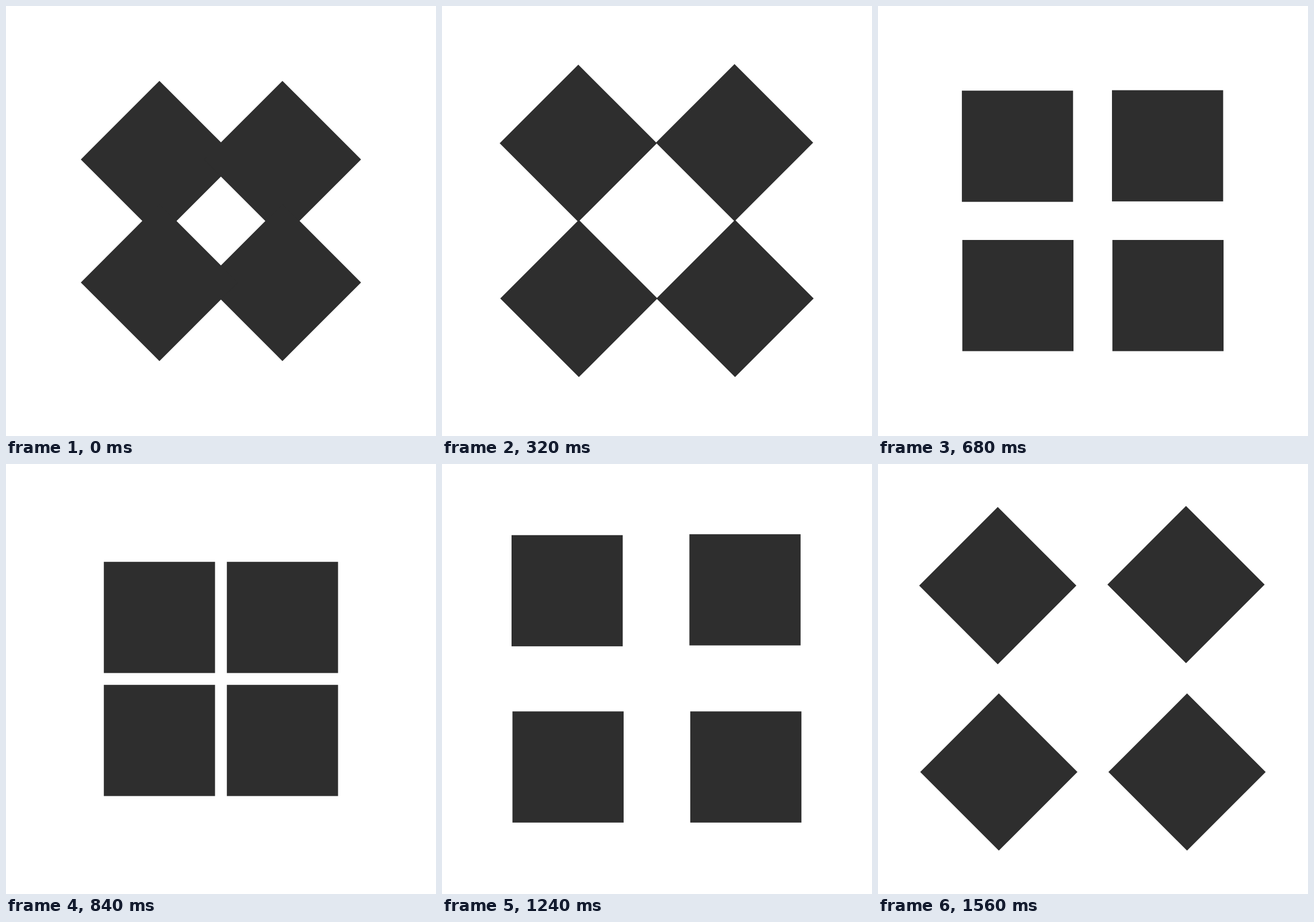
Write an HTML page that moves like this. It is 748x748 px and loops after 1.6 s.

```html
<!DOCTYPE html>
<html>
<head>
<meta charset="utf-8">
<style>
  html, body { margin: 0; width: 100%; height: 100%; overflow: hidden; background: #fff; }
  svg { display: block; width: 100vw; height: 100vh; }
</style>
</head>
<body>
<svg viewBox="0 0 748 748" fill="#2e2e2e"></svg>
<script>
  const LOOP = 1600, STEP = 40;
  const CENTER = 373.9, REST = 107, REACH = 101.2, SIDE = 193.4;

  // Rest corner (sx, sy), outward travel (dx, dy), direction of spin
  const tiles = [
    { sx: -1, sy: -1, dx: -1.033, dy: -0.975, spin: 1 },
    { sx: 1, sy: -1, dx: 0.969, dy: -1.008, spin: -1 },
    { sx: 1, sy: 1, dx: 1, dy: 0.969, spin: 1 },
    { sx: -1, sy: 1, dx: -1, dy: 0.969, spin: -1 }
  ];

  const svg = document.querySelector('svg');
  for (const tile of tiles) {
    tile.node = document.createElementNS(svg.namespaceURI, 'rect');
    for (const key of ['x', 'y']) tile.node.setAttribute(key, -SIDE / 2);
    for (const key of ['width', 'height']) tile.node.setAttribute(key, SIDE);
    svg.append(tile.node);
  }

  const ease = (t, from, to) => {
    const u = Math.min(1, Math.max(0, (t - from) / (to - from)));
    return u * u * (3 - 2 * u);
  };

  function draw(t) {
    const push = REACH * (ease(t, 240, 467) - ease(t, 467, 777)
      + ease(t, 1092, 1400) - ease(t, 1400, 1748));
    const angle = 45 * (1 - ease(t, 367, 571) + ease(t, 1343, 1543));
    for (const { sx, sy, dx, dy, spin, node } of tiles) {
      const x = CENTER + sx * REST + dx * push;
      const y = CENTER + sy * REST + dy * push;
      node.setAttribute('transform', `translate(${x} ${y}) rotate(${spin * angle})`);
    }
  }

  const start = performance.now();
  function tick() {
    const t = (performance.now() - start) % LOOP;
    draw(Math.floor(t / STEP) * STEP);
    requestAnimationFrame(tick);
  }
  tick();
</script>
</body>
</html>
```
